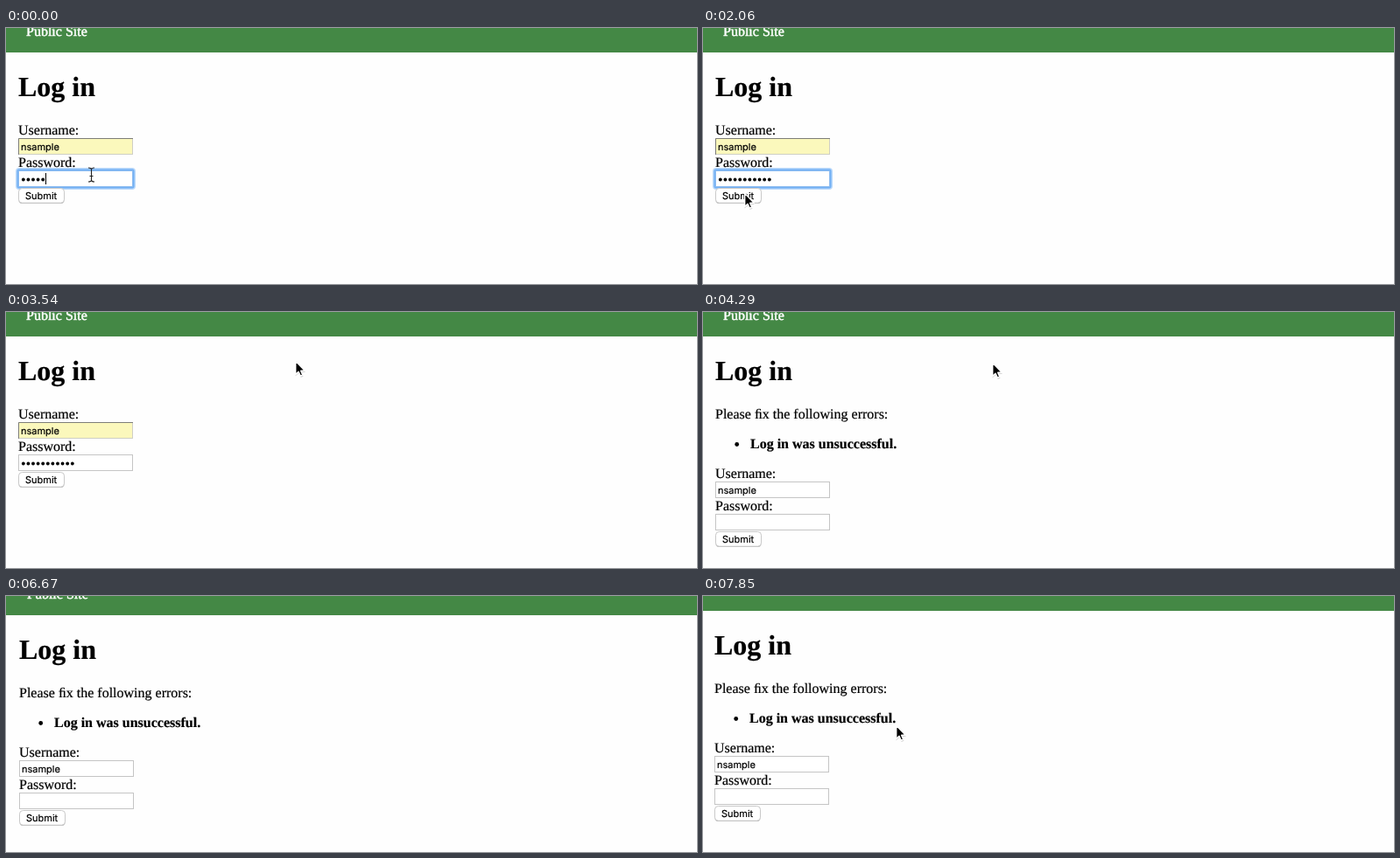
An HTML page for the animation above (8000 ms loop, 789 by 293 pixels).

```html
<!DOCTYPE html>
<html lang="en">
<head>
<meta charset="utf-8">
<title>Log in</title>
<style>
  html, body { margin: 0; width: 100%; height: 100%; overflow: hidden; background: #fefefe; }
  svg { display: block; width: 789px; height: 293px; }
  text {
    font: 16px "Liberation Serif", Times, serif;
    fill: #000; stroke: #000; stroke-width: .2px;
    text-rendering: geometricPrecision;
  }
  .title { font-size: 32px; font-weight: bold; }
  .bold { font-weight: bold; }
  .nav { fill: #fff; stroke: #fff; stroke-width: .5px; }
  .ui { font: 11px Inter, "Open Sans", sans-serif; }
  .box { fill: #fff; stroke: #c5c5c5; }
</style>
</head>
<body>
<svg viewBox="0 0 789 293">
  <defs>
    <linearGradient id="blue" x2="0" y2="1">
      <stop offset="0" stop-color="#6bb1f9"/>
      <stop offset="1" stop-color="#1f80f5"/>
    </linearGradient>
  </defs>

  <g id="page">
    <rect x="-10" y="-40" width="810" height="68" fill="#448845"/>
    <text class="nav" x="23" y="9">Public Site</text>
    <text class="title" x="14" y="78">Log in</text>

    <g id="errors">
      <text x="14" y="122">Please &#xfb01;x the following errors:</text>
      <circle cx="38.7" cy="151.5" r="2.4"/>
      <text class="bold" x="54" y="156">Log in was unsuccessful.</text>
    </g>

    <g id="form">
      <text x="14" y="122">Username:</text>
      <rect class="box" x="14.5" y="126.5" width="130" height="18"/>
      <g id="autofill">
        <rect x="14.5" y="126.5" width="130" height="18" fill="#fbf8bc" stroke="#cfcfc4"/>
        <path d="M14.5 145V126.5H145" fill="none" stroke="#7d7d78"/>
      </g>
      <text class="ui" x="17" y="140">nsample</text>

      <text x="14" y="159">Password:</text>
      <g id="ring" fill="none">
        <rect x="13" y="162" width="133" height="21" rx="2" stroke="#b9d8fa" stroke-width="4"/>
        <rect x="13.5" y="162.5" width="132" height="20" rx="1" stroke="#72b0f4" stroke-width="2"/>
      </g>
      <rect id="password" class="box" x="14.5" y="163.5" width="130" height="18"/>
      <g id="dots"></g>
      <rect id="caret" y="166" width="1" height="13"/>

      <rect x="14.5" y="184" width="52" height="17" rx="4" fill="#b2b2b2"/>
      <rect id="button" x="14.5" y="183.5" width="52" height="16.7" rx="4" fill="#fff" stroke="#c9c9c9"/>
      <text class="ui" x="22" y="196">Submit</text>
    </g>
  </g>

  <path id="beam" transform="translate(97.5 168)"
        d="M-3.5 -8Q0 -8 0 -6Q0 -8 3.5 -8M0 -6V6M-3.5 8Q0 8 0 6Q0 8 3.5 8M-2 1.5H2"
        fill="none" stroke="#222" stroke-width="1.1"/>
  <g id="arrow">
    <path d="M0 1.5V17.5L3.8 14L6.2 19L9 17.8L6.8 13H11.5Z" fill="#000" opacity=".16"/>
    <path d="M.2 .2V15.6L3.5 12.3L5.8 17.2L8.2 16.2L6.1 11.3H10.8Z"
          fill="#000" stroke="#fff" stroke-width="1.4" stroke-linejoin="round"/>
  </g>
</svg>

<script>
const LOOP = 8000;
const STEP = 148;
const LEAD = 14;
const DOT = 5.6;
const MAX_DOTS = 11;

// All moments below are counted in steps.
const PRESS = 15, RELEASE = 16, FAILED = 25, SCROLL = 45;

// Each glide follows a Bezier curve and rests at its end.
const glides = [
  { from: 9, to: 14, curve: [[99, 186], [98, 228], [47.5, 189]] },
  { from: 20, to: 24, curve: [[47.5, 189], [340, 0], [330.5, 56]] },
  { from: 29, to: 36, curve: [[330.5, 58], [345, 170], [438, 115], [369.5, -11]] },
  { from: 49, to: 53, curve: [[208, 196], [224, 168], [220.5, 148]] }
];

const el = id => document.getElementById(id);
const clamp = (v, lo, hi) => Math.min(hi, Math.max(lo, v));
const show = (id, on) => el(id).style.display = on ? "" : "none";
const move = (id, x, y) => el(id).setAttribute("transform", `translate(${x} ${y})`);

// de Casteljau, for any number of points
function bezier(points, u) {
  if (points.length === 1) return points[0];
  const next = points.slice(1).map((p, i) => p.map((v, k) => points[i][k] + (v - points[i][k]) * u));
  return bezier(next, u);
}

function dotCount(step) {
  if (step >= FAILED) return 0;
  return clamp(step < 3 ? 5 + step : 4 + step, 5, step < 3 ? 6 : MAX_DOTS);
}

function drawArrow(step) {
  const glide = glides.findLast(g => g.from <= step);
  show("arrow", glide && (step < 37 || step >= 49));
  if (!glide) return;
  const u = clamp((step - glide.from) / (glide.to - glide.from), 0, 1);
  move("arrow", ...bezier(glide.curve, u));
}

function drawScroll(step) {
  const k = clamp(step - SCROLL + 1, 0, 3);
  move("page", k && 2 - k, Math.round(-11 * (1 - (1 - k / 3) ** 2)));
}

function drawForm(step) {
  const failed = step >= FAILED;
  const focused = step < PRESS;
  const count = dotCount(step);

  show("errors", failed);
  show("autofill", !failed);
  move("form", 0, failed ? 68 : 0);

  show("ring", focused);
  el("password").style.stroke = focused ? "#8fbdf0" : "";
  [...el("dots").children].forEach((dot, i) => dot.style.display = i < count ? "" : "none");
  show("caret", step < 12);
  el("caret").setAttribute("x", Math.round(17 + count * DOT));
  el("button").style.fill = step >= PRESS && step < RELEASE ? "url(#blue)" : "";
}

for (let i = 0; i < MAX_DOTS; i++) {
  const dot = document.createElementNS("http://www.w3.org/2000/svg", "circle");
  dot.setAttribute("cx", 19.8 + i * DOT);
  dot.setAttribute("cy", 173.5);
  dot.setAttribute("r", 1.9);
  el("dots").append(dot);
}

const start = performance.now();
function tick() {
  const time = (performance.now() - start) % LOOP;
  const step = Math.floor((time + LEAD) / STEP);
  drawForm(step);
  drawScroll(step);
  show("beam", step < 9);
  drawArrow(step);
  requestAnimationFrame(tick);
}
tick();
</script>
</body>
</html>
```
